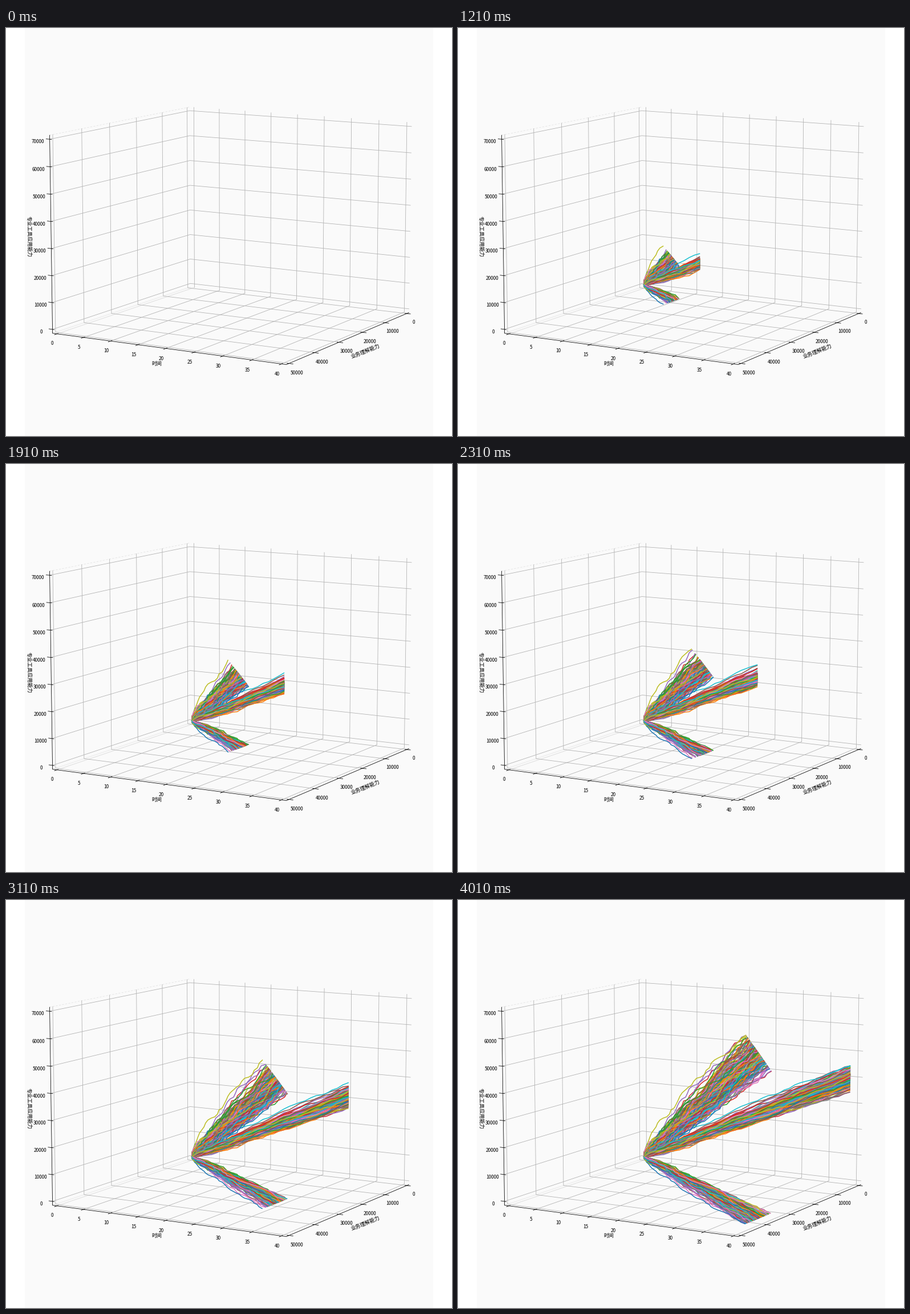
A matplotlib script for the animation above (4.11 s loop, 782x716 px).

```python
import numpy as np
import matplotlib.pyplot as plt
from matplotlib.animation import FuncAnimation
from matplotlib.collections import LineCollection
from matplotlib.patches import Rectangle

W, H, DPI = 782, 716, 64
PX = 72 / DPI                      # one pixel in points
FRAMES, INTERVAL = 137, 30
PEOPLE, STEPS = 200, 40
FONT = "Noto Sans CJK JP"

# Axis ranges: time, y, z
SPAN = np.array([40, 50000, 70000])
BOX = np.array([8, 8, 6]) / 7      # sides of the plot box
LO, HI = -SPAN / 48, SPAN * 49 / 48
DELTA = SPAN / 12
ELEV, AZIM, DIST = np.radians(10), np.radians(-60), 10
FOCAL = H * DIST / 1.85
CX, CY = (W - H) / 2 + H * 0.95 / 1.85, H * 0.9 / 1.85


def project(t, y, z):
    """Perspective view of data coordinates, in stage pixels."""
    a = (np.asarray(t) / SPAN[0] - 0.5) * BOX[0]
    b = (0.5 - np.asarray(y) / SPAN[1]) * BOX[1]
    c = (np.asarray(z) / SPAN[2] - 0.5) * BOX[2]
    toward = a * np.cos(AZIM) + b * np.sin(AZIM)
    right = -a * np.sin(AZIM) + b * np.cos(AZIM)
    up = c * np.cos(ELEV) - toward * np.sin(ELEV)
    depth = DIST - toward * np.cos(ELEV) - c * np.sin(ELEV)
    k = FOCAL / depth
    return np.stack(np.broadcast_arrays(CX + k * right, CY - k * up), axis=-1)


fig = plt.figure(figsize=(W / DPI, H / DPI), dpi=DPI, facecolor="white")
ax = fig.add_axes([0, 0, 1, 1])
ax.set_xlim(0, W)
ax.set_ylim(H, 0)
ax.axis("off")
ax.add_patch(Rectangle(((W - H) / 2, 0), H, H, fc="#fafafa", lw=0))


def path(points, color="#b0b0b0", width=0.8, order=2, **style):
    xy = project(*np.array(points, float).T)
    ax.plot(xy[:, 0], xy[:, 1], color=color, lw=width * PX, zorder=order, **style)


def tick(point, axis):
    """Short mark across the axis line; it reaches further outward."""
    sign = -1 if point[axis] < 0 else 1
    ends = []
    for reach in (0.2, -0.1):
        end = np.array(point, float)
        end[axis] += sign * reach * DELTA[axis]
        ends.append(end)
    path(ends, "black", order=4)


def number(value, point, axis):
    """Tick label pushed away from the box."""
    pos = np.array(point, float)
    for i in range(3):
        if i != axis:
            pos[i] += np.sign(pos[i]) * 0.385 * DELTA[i]
    x, y = project(*pos)
    ax.text(x, y + 6.4, str(value), family=FONT, size=8.2 * PX,
            ha="center", va="baseline", zorder=4)


def title(x, y, words, angle):
    ax.text(x, y, words, family=FONT, size=9 * PX, rotation=angle,
            ha="center", va="center", zorder=4)


t0, y0, z0 = LO
t1, y1, z1 = HI

# Faint pane edges
path([(t0, y1, z1), (t0, y0, z1)], "#e2e2e2", order=1, dashes=(4, 3))
path([(t0, y1, z0), (t0, y0, z0)], "#e6e6e6", order=1)

# Grid, ticks and numbers
for t in range(0, 41, 5):
    path([(t, y1, z0), (t, y0, z0)], "#b0b0b0" if t else "#d8d8d8")
    path([(t, y0, z0), (t, y0, z1)])
    tick((t, y1, z0), 1)
    number(t, (t, y1, z0), 0)
for y in range(0, 50001, 10000):
    path([(t1, y, z0), (t0, y, z0), (t0, y, z1)])
    tick((t1, y, z0), 0)
    number(y, (t1, y, z0), 1)
for z in range(0, 70001, 10000):
    path([(t0, y1, z), (t0, y0, z), (t1, y0, z)])
    tick((t0, y1, z), 0)
    number(z, (t0, y1, z), 2)

# Axis lines and titles
path([(t0, y1, z1), (t0, y1, z0), (t1, y1, z0), (t1, y0, z0)], "black", order=3)
title(264.5, 589.5, "时间", 0)
title(630.5, 568, "业务理解能力", 22)
title(39.5, 366, "专业工具应用能力", -89)

# Random growth of each person: the curve itself and its two projections
rng = np.random.default_rng(12)
gain = rng.uniform(450, 1560, (PEOPLE, STEPS))
gain[:, 0] = 0
gain[:, 1] = rng.uniform(300, 2000, PEOPLE)
skill = gain.cumsum(axis=1)
time = np.arange(STEPS)
curves = np.stack([project(time, skill, 1.5 * skill),
                   project(time, 0, skill),
                   project(time, skill, 0)], axis=1).reshape(-1, STEPS, 2)
lines = LineCollection([], colors=[f"C{i % 10}" for i in range(len(curves))],
                       linewidths=1.5 * PX, capstyle="projecting",
                       joinstyle="round", zorder=5)
ax.add_collection(lines, autolim=False)


def update(i):
    # The first picture holds 210 ms, each later one 100 ms.
    n = max(0, (i * INTERVAL - 90) // 100)
    lines.set_segments(curves[:, :n + 1] if n else [])
    return [lines]


anim = FuncAnimation(fig, update, frames=FRAMES, interval=INTERVAL,
                     init_func=lambda: update(0), repeat=True, repeat_delay=0)
plt.show()
```
